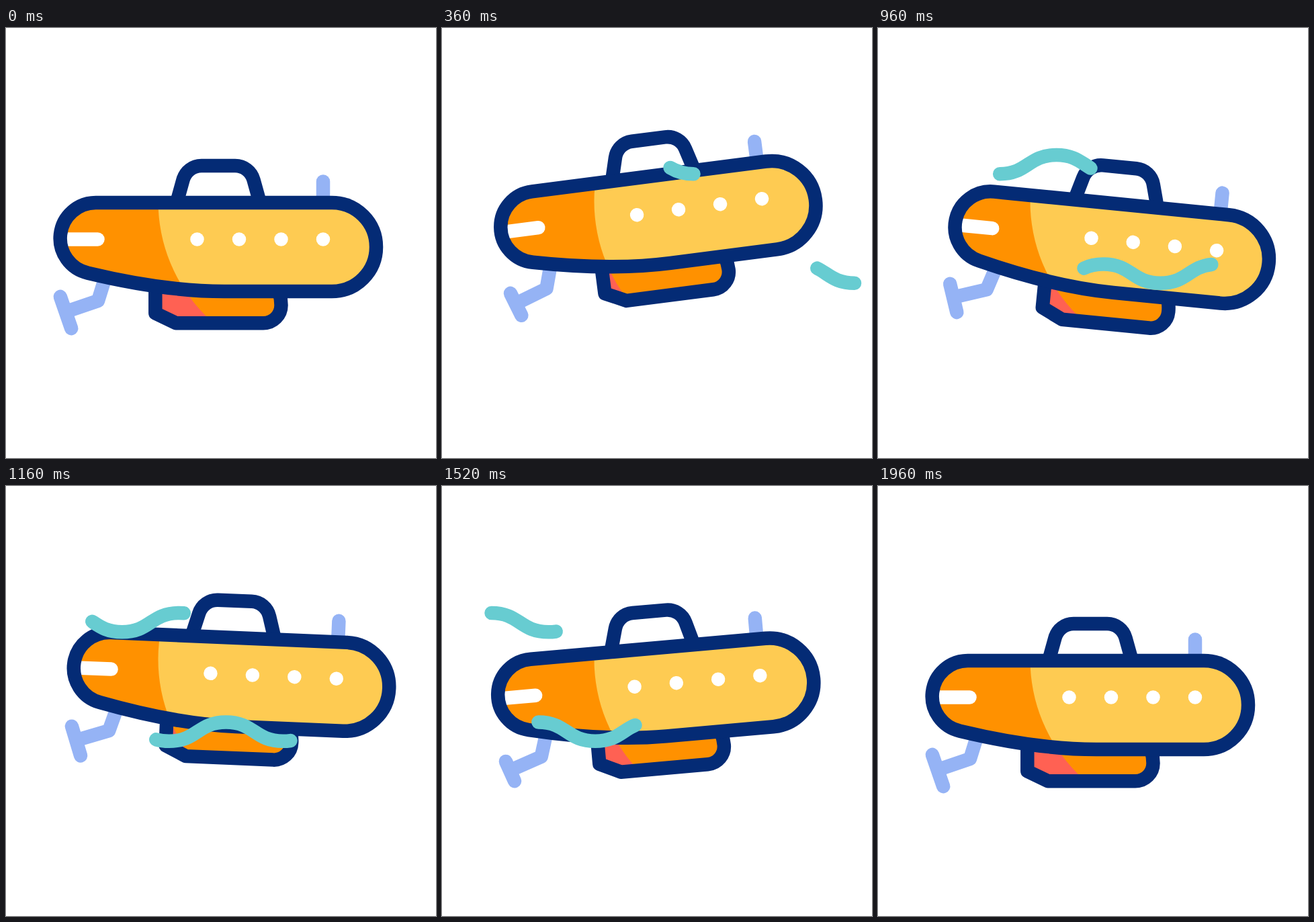
An HTML page that plays this animation: 640x640 px, repeating every 2 s.

```html
<!DOCTYPE html>
<html lang="en">
<head>
<meta charset="utf-8">
<title>Submarine</title>
<style>
  html, body { margin: 0; width: 100%; height: 100%; overflow: hidden; background: #fff; }
  svg { display: block; width: 100%; height: 100%; }
  .line { fill: none; stroke-width: 20.5; stroke-linejoin: round; }
  .navy { stroke: #042b75; }
  .blue { stroke: #95b3f5; stroke-linecap: round; }
  .teal { stroke: #67ccd1; stroke-linecap: round; }
  .red { fill: #ff6153; }
  .orange { fill: #ff9100; }
  .yellow { fill: #fecb52; }
</style>
</head>
<body>
<svg viewBox="0 0 640 640">
  <defs>
    <clipPath id="light"><circle cx="467" cy="258" r="240.5"/></clipPath>
    <path id="hull" d="M134 260H485A66 66 0 0 1 485 392H325C257 392 190 381 122 364.7A53 53 0 0 1 134 260Z"/>
    <path id="cabin" d="M222.3 386V424.5L253 439.2H383A26.5 26.5 0 0 0 409.5 412.5Q409.5 404 407 394"/>
  </defs>

  <g class="sub">
    <path class="line blue" d="M472 228.5V258"/>
    <path class="line blue" d="M147 374L137 406L90 422"/>
    <path class="line blue" id="prop"/>
    <use href="#cabin" class="red"/>
    <use href="#hull" class="orange"/>
  </g>

  <!-- the lit area stays put while the submarine moves through it -->
  <g clip-path="url(#light)">
    <g class="sub">
      <use href="#cabin" class="orange"/>
      <use href="#hull" class="yellow"/>
    </g>
  </g>

  <g class="sub">
    <use href="#cabin" class="line navy"/>
    <path class="line navy" d="M256 253L263.5 226C267 213.5 278 205 291 205H341C354 205 365 213.5 368.5 226L376 253"/>
    <path class="line" stroke="#fff" stroke-linecap="round" d="M84 314.5H136.5"/>
    <g id="ports" fill="#fff"></g>
    <use href="#hull" class="line navy"/>
  </g>

  <path class="line teal" id="upper" pathLength="1"/>
  <path class="line teal" id="lower" pathLength="1"/>
</svg>

<script>
const LOOP = 2000, STEP = 40, HALF = 84.8;
const $ = id => document.getElementById(id);
const subs = document.querySelectorAll('.sub');

// tables of [time, value]
const posX = [[0, 320], [360, 326], [560, 333.2], [680, 341.8], [900, 353.5],
              [960, 352.3], [1120, 342.3], [1360, 327.6], [1680, 320], [2000, 320]];
const posY = [[0, 320], [495, 270], [900, 325], [1300, 270.5], [1680, 320], [2000, 320]];
const tilt = [[0, 0], [360, -7.35], [500, -8.2], [680, -6.75], [800, -2], [960, 5.65],
              [1020, 6.6], [1360, -5.65], [1420, -6], [1680, -2.4], [1960, 0], [2000, 0]];

const slope = (k, i) => (k[i + 1][1] - k[i][1]) / (k[i + 1][0] - k[i][0]);

function tangent(k, i) {
  if (i === 0 || i === k.length - 1) return 0;
  const a = slope(k, i - 1), b = slope(k, i);
  return a * b > 0 ? 2 * a * b / (a + b) : 0;
}

// smooth curve through a table, without overshoot
function sample(k, t) {
  let i = 0;
  while (i < k.length - 2 && t >= k[i + 1][0]) i++;
  const [t0, v0] = k[i], [t1, v1] = k[i + 1];
  const d = t1 - t0, u = (t - t0) / d, w = 1 - u;
  return v0 * w * w * (1 + 2 * u) + v1 * u * u * (3 - 2 * u)
       + d * u * w * (tangent(k, i) * w - tangent(k, i + 1) * u);
}

const ramp = (t, from, to) => Math.min(1, Math.max(0, (t - from) / (to - from)));

// wave from a trough on the right to a crest on the left
function makeWave(id, right, low, high, halves, tailStart, tailEnd) {
  const el = $(id);
  let d = `M${right} ${low}`;
  for (let i = 0; i < halves; i++) {
    const x = right - i * HALF, [a, b] = i % 2 ? [high, low] : [low, high];
    d += `C${x - HALF / 2} ${a} ${x - HALF / 2} ${b} ${x - HALF} ${b}`;
  }
  el.setAttribute('d', d);
  return t => {
    const head = ramp(t, 208, 1338), tail = ramp(t, tailStart, tailEnd);
    el.style.display = head > tail ? '' : 'none';
    el.setAttribute('stroke-dasharray', `${head - tail} 3`);
    el.setAttribute('stroke-dashoffset', -tail);
    el.setAttribute('transform', `translate(${-0.0402 * t} 0)`);
  };
}

const waves = [
  makeWave('upper', 389, 217.3, 189, 3, 813, 1944),
  makeWave('lower', 628.5, 379.8, 351.5, 5, 680, 1958)
];

for (let i = 0; i < 4; i++) {
  const c = document.createElementNS('http://www.w3.org/2000/svg', 'circle');
  c.setAttribute('cx', 284.5 + 62.5 * i);
  c.setAttribute('cy', 314.5);
  c.setAttribute('r', 10.25);
  $('ports').append(c);
}

function draw(t) {
  const move = `translate(${sample(posX, t)} ${sample(posY, t)}) rotate(${sample(tilt, t)}) translate(-320 -320)`;
  subs.forEach(g => g.setAttribute('transform', move));

  const len = 1 - 0.36 * Math.sin(Math.PI * 20 * t / 1960) ** 2;
  const dx = 8.2 * len, dy = 23.6 * len;
  $('prop').setAttribute('d', `M${89 - dx} ${423.5 - dy}L${89 + dx} ${423.5 + dy}`);

  waves.forEach(w => w(t));
}

function tick() {
  draw(Math.floor(performance.now() % LOOP / STEP) * STEP);
  requestAnimationFrame(tick);
}
tick();
</script>
</body>
</html>
```
